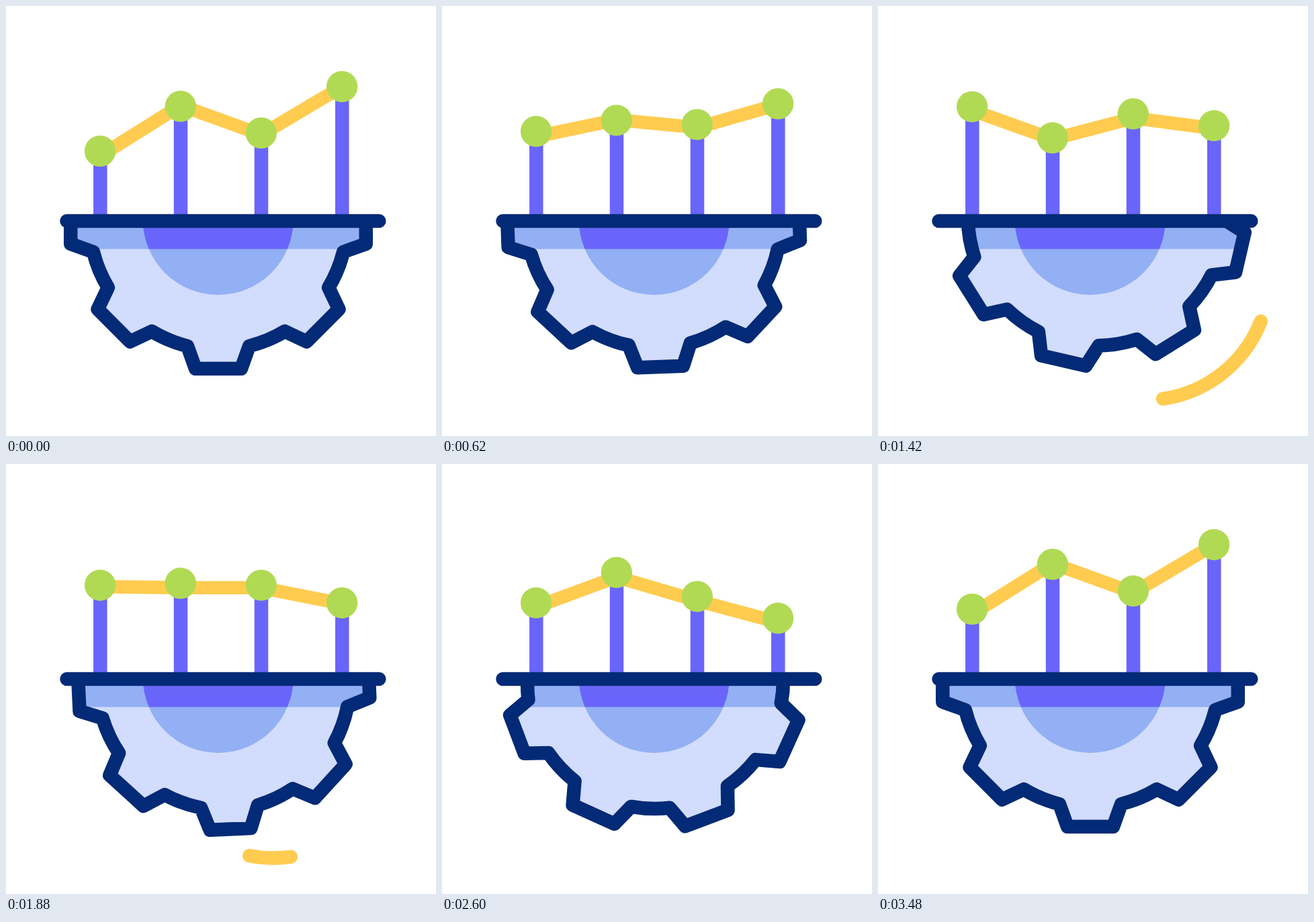
An HTML page that plays this animation: 640 by 640 pixels, repeating every 3.6 s.

```html
<!DOCTYPE html>
<html lang="en">
<head>
<meta charset="utf-8">
<title>Gear and chart</title>
<style>
  html, body { margin: 0; width: 100%; height: 100%; overflow: hidden; background: #fff; }
  svg { display: block; width: 100vw; height: 100vh; }
</style>
</head>
<body>
<svg viewBox="0 0 640 640" fill="none">
  <defs>
    <clipPath id="below"><rect y="320" width="640" height="320"/></clipPath>
    <clipPath id="inside"><path class="gear"/></clipPath>
    <clipPath id="hub"><circle cx="315.7" cy="318" r="112"/></clipPath>
  </defs>
  <g id="bars" stroke="#6965fa" stroke-width="20.5"></g>
  <path id="trend" stroke="#ffcc50" stroke-width="19.8" stroke-linejoin="round"/>
  <g id="dots" fill="#b1da54"></g>
  <g clip-path="url(#below)">
    <path class="gear" fill="#d2dcfd"/>
    <rect y="320" width="640" height="41.7" fill="#92b0f3" clip-path="url(#inside)"/>
    <circle cx="315.7" cy="318" r="112" fill="#92b0f3"/>
    <rect y="320" width="640" height="41.7" fill="#6965fa" clip-path="url(#hub)"/>
    <path class="gear" stroke="#032a76" stroke-width="20.5" stroke-linejoin="round"/>
  </g>
  <path d="M90.5 320H555.3" stroke="#032a76" stroke-width="20.5" stroke-linecap="round"/>
  <path id="swoosh" stroke="#ffcc50" stroke-width="20.4" stroke-linecap="round"/>
</svg>
<script>
const LOOP = 3600;
const RAD = Math.PI / 180;
const COLUMNS = [140.3, 260, 380, 500.3];

// Heights of the dots and of the trend line in each pose.
const POSES = [
  { dots: [216, 149.3, 189, 120], line: [223, 148, 191.5, 120] },
  { dots: [149.5, 196.5, 160.3, 177.8], line: [155.3, 198.2, 166.7, 182.3] },
  { dots: [206.5, 161.5, 197.2, 231], line: [212.5, 168.5, 203.5, 236.5] }
];
// The line trails the dots by a short lag.
const MOVES = [
  { start: 140, span: 1020, lag: 8 },
  { start: 1350, span: 1020, lag: 33 },
  { start: 2515, span: 865, lag: 20 }
];
// Time and clockwise angle of the gear.
const SPIN = [[115, 0], [620, 42.8], [1060, 123.2], [1420, 192.8],
  [1880, 267.2], [2600, 339.3], [3360, 358], [3480, 360]];

const $ = id => document.getElementById(id);
const clamp = v => Math.min(1, Math.max(0, v));
const mix = (a, b, p) => a + (b - a) * p;

// Symmetric cubic-bezier(a, 0, 1 - a, 1).
function ease(u, a) {
  u = clamp(u);
  let lo = 0, hi = 1;
  for (let i = 0; i < 24; i++) {
    const s = (lo + hi) / 2, r = 1 - s;
    const x = 3 * a * s * r * r + 3 * (1 - a) * s * s * r + s * s * s;
    if (x < u) lo = s; else hi = s;
  }
  const s = (lo + hi) / 2;
  return s * s * (3 - 2 * s);
}

// Smooth curve through the given points, level at both ends.
function spline(points, t) {
  const last = points.length - 1;
  if (t <= points[0][0]) return points[0][1];
  if (t >= points[last][0]) return points[last][1];
  const slope = i => i === 0 || i === last ? 0 :
    (points[i + 1][1] - points[i - 1][1]) / (points[i + 1][0] - points[i - 1][0]);
  let i = 0;
  while (t > points[i + 1][0]) i++;
  const [x0, y0] = points[i], [x1, y1] = points[i + 1];
  const w = x1 - x0, u = (t - x0) / w, v = 1 - u;
  return mix(y0, y1, u * u * (3 - 2 * u)) +
    w * u * v * (slope(i) * v - slope(i + 1) * u);
}

const polar = (cx, cy, r, deg) =>
  (cx + r * Math.cos(deg * RAD)).toFixed(2) + " " + (cy + r * Math.sin(deg * RAD)).toFixed(2);

// Two half gears; the upper one sits a little lower, so the side teeth are narrow.
function gearPath() {
  const root = 191.7, tip = 222.4;
  const at = (r, deg) => polar(316, Math.sin(deg * RAD) > 0 ? 320 : 327.3, r, deg);
  let d = "";
  for (let k = 0; k < 8; k++) {
    const mid = k * 45;
    d += (k ? `A${root} ${root} 0 0 1 ` : "M") + at(root, mid - 13.9) +
      "L" + at(tip, mid - 8.8) + "L" + at(tip, mid + 8.8) + "L" + at(root, mid + 13.9);
  }
  return d + `A${root} ${root} 0 0 1 ` + at(root, -13.9) + "Z";
}

function add(parent, tag, attrs) {
  const el = document.createElementNS("http://www.w3.org/2000/svg", tag);
  for (const k in attrs) el.setAttribute(k, attrs[k]);
  return parent.appendChild(el);
}

const gears = [...document.querySelectorAll(".gear")];
gears.forEach(g => g.setAttribute("d", gearPath()));
const bars = COLUMNS.map(x => add($("bars"), "line", { x1: x, x2: x, y2: 320 }));
const dots = COLUMNS.map(x => add($("dots"), "circle", { cx: x - 0.2, r: 23.2 }));

function drawChart(t) {
  let from = 0;
  while (from < 2 && t >= MOVES[from + 1].start) from++;
  const { start, span, lag } = MOVES[from];
  const a = POSES[from], b = POSES[(from + 1) % 3];
  const p = ease((t - start) / span, 0.52);
  const q = ease((t - start - lag) / span, 0.52);
  COLUMNS.forEach((x, i) => {
    const y = mix(a.dots[i], b.dots[i], p);
    bars[i].setAttribute("y1", y);
    dots[i].setAttribute("cy", y);
  });
  $("trend").setAttribute("d", "M" +
    COLUMNS.map((x, i) => x + " " + mix(a.line[i], b.line[i], q)).join("L"));
}

function drawSwoosh(t) {
  const head = ease((t - 1160) / 400, 0.45);
  const tail = ease((t - 1620) / 400, 0.45);
  const shown = head > 0.001 && tail < 0.999;
  const at = p => polar(398, 402, 184.5, mix(21.4, 101.2, p));
  $("swoosh").setAttribute("d", shown ? `M${at(tail)}A184.5 184.5 0 0 1 ${at(head)}` : "");
}

function render(t) {
  drawChart(t);
  drawSwoosh(t);
  const turn = `rotate(${spline(SPIN, t)} 320 320)`;
  gears.forEach(g => g.setAttribute("transform", turn));
}

const begin = performance.now();
function tick() {
  render((performance.now() - begin) % LOOP);
  requestAnimationFrame(tick);
}
render(0);
requestAnimationFrame(tick);
</script>
</body>
</html>
```
